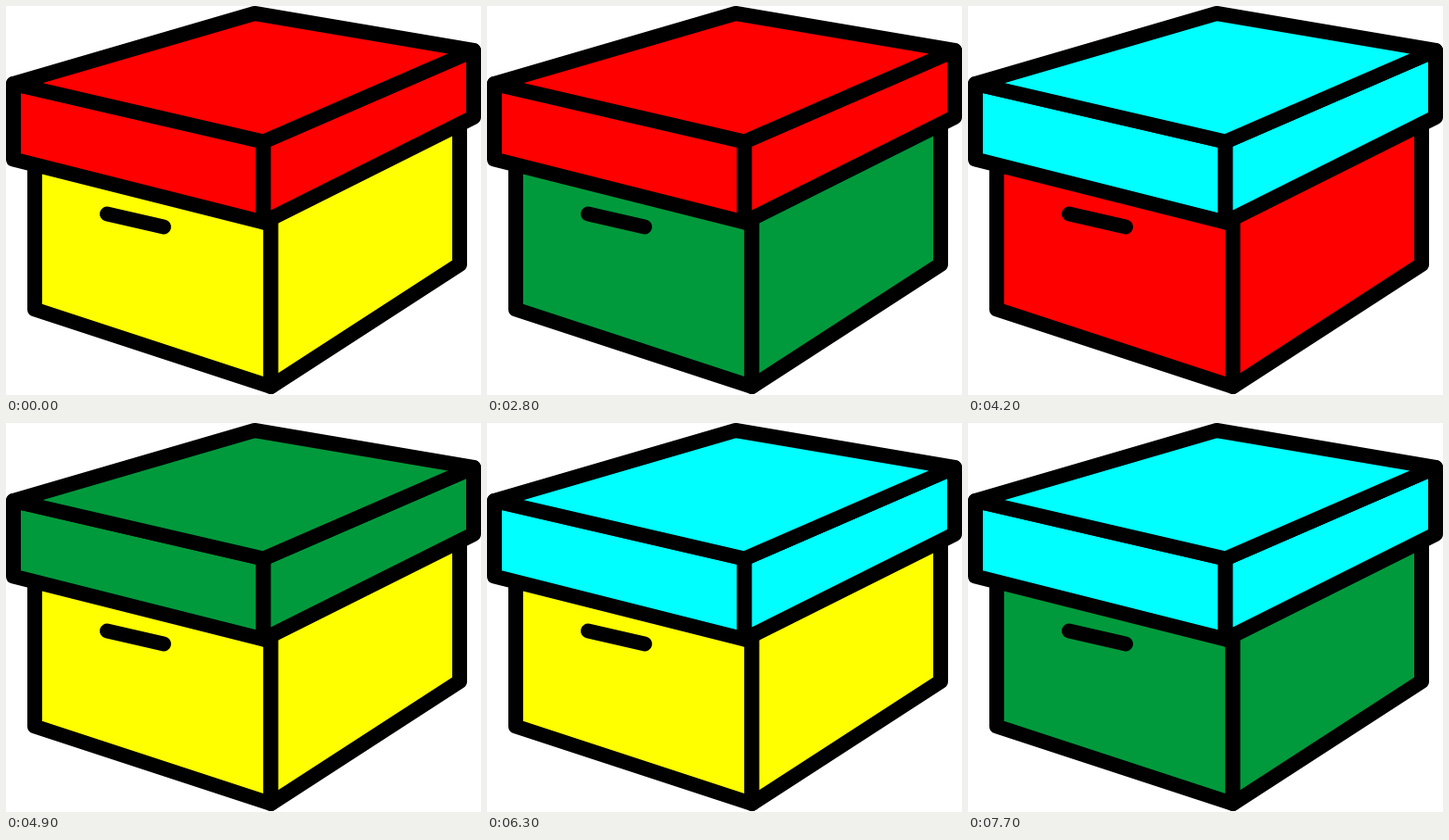
An HTML page with a canvas for the animation above (8.4 s loop, 512 px wide and 420 px high).

```html
<!DOCTYPE html>
<html lang="en">
<head>
<meta charset="utf-8">
<title>Box</title>
<style>
html, body { margin: 0; width: 100%; height: 100%; overflow: hidden; background: #fff; }
canvas { display: block; }
</style>
</head>
<body>
<canvas id="stage" width="512" height="420"></canvas>
<script>
const ctx = document.getElementById('stage').getContext('2d');
const STEP = 700;
const COLORS = { R: '#ff0000', Y: '#ffff00', C: '#00ffff', G: '#009a3c' };

// Every lid and base colour pairing appears once per loop.
const LIDS = 'RYRGRYCGYCGC';
const BASES = 'YGCRGCRYRYCG';

// Visible corners of the lid's top, from which the sides hang.
const left = [8, 84], back = [268, 8], right = [504, 48], front = [277.5, 146.5];

function face(points, color) {
  ctx.beginPath();
  for (const [x, y] of points) ctx.lineTo(x, y);
  ctx.closePath();
  ctx.fillStyle = color;
  ctx.fill();
  ctx.stroke();
}

// Upright face under the edge a-b, reaching down to the given heights.
function side(a, b, lowA, lowB, color) {
  face([a, b, [b[0], lowB], [a[0], lowA]], color);
}

function draw(index) {
  const lid = COLORS[LIDS[index]], base = COLORS[BASES[index]];
  ctx.clearRect(0, 0, 512, 420);
  ctx.lineWidth = 16;
  ctx.lineJoin = ctx.lineCap = 'round';

  // The lid covers the base's upper edges.
  const edge = [285.5, 190];
  side([31, 130], edge, 327.5, 411, base);
  side(edge, [489, 90], 411, 279, base);

  side(left, front, 165.5, 233.5, lid);
  side(front, right, 233.5, 120, lid);
  face([left, back, right, front], lid);

  face([[109, 224.5], [170, 238.5]]);
}

const start = performance.now();
let shown = 0;

function tick() {
  const index = Math.floor((performance.now() - start) / STEP) % LIDS.length;
  if (index !== shown) draw(shown = index);
  requestAnimationFrame(tick);
}

draw(shown);
requestAnimationFrame(tick);
</script>
</body>
</html>
```
